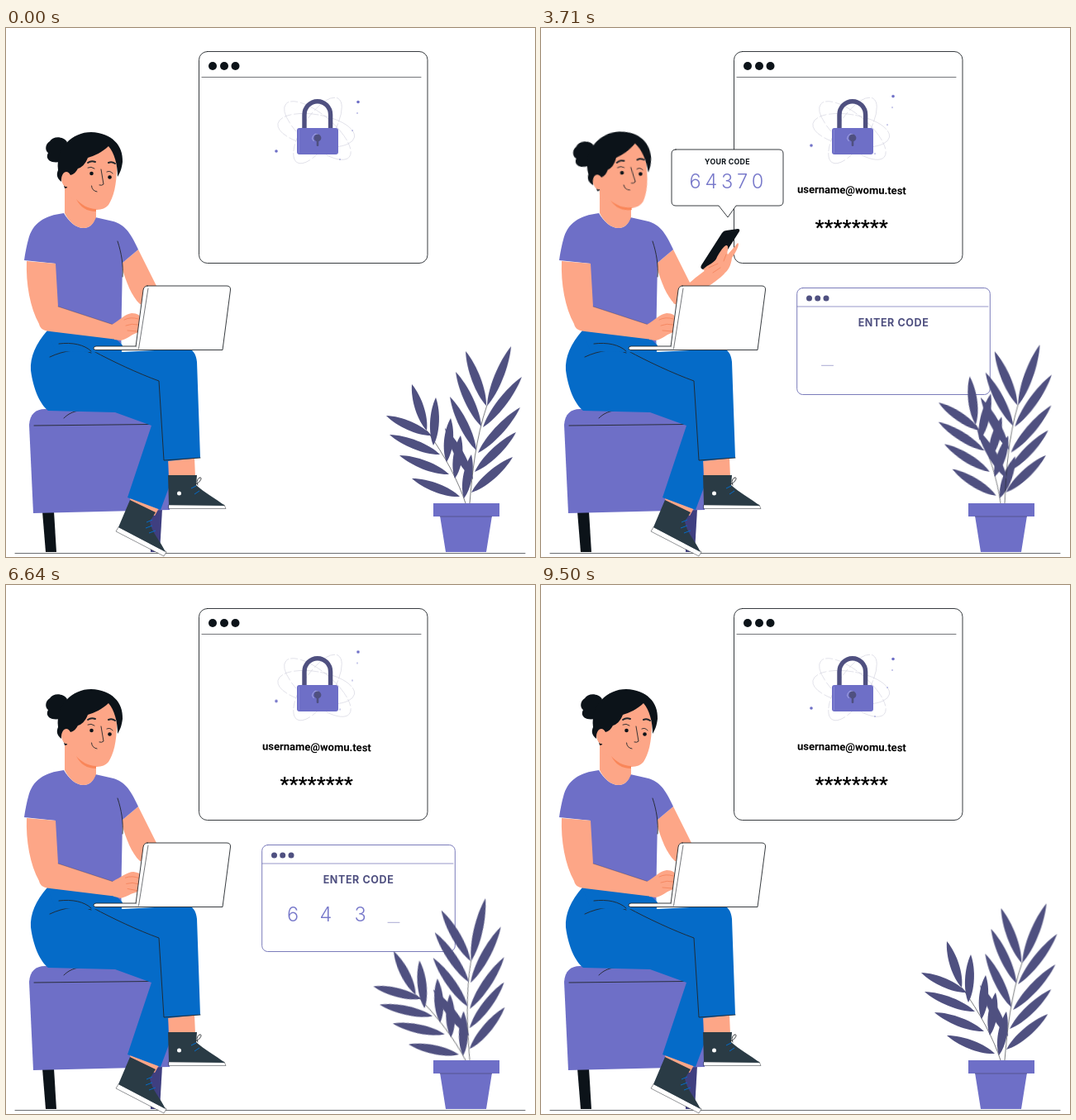
Recreate the animation shown at these times as an HTML page. Size 640x640 px, loop 9.57 s.

```html
<!DOCTYPE html>
<html lang="en">
<head>
<meta charset="utf-8">
<title>Two-step login</title>
<style>
html, body { margin: 0; width: 100%; height: 100%; overflow: hidden; background: #fff; }
svg { display: block; width: 100vw; height: 100vh; }
.skin { fill: #fda687; }
.blue { fill: #056bc8; }
.purple { fill: #6e6fc7; }
.plum { fill: #4f5080; }
.ink { fill: #0c1319; }
.shoe { fill: #2a3b45; }
.paper { fill: #fff; }
.line { fill: none; stroke: #22262b; stroke-width: .9; stroke-linecap: round; stroke-linejoin: round; }
.paper.line { fill: #fff; }
.brow { stroke-width: 2; }
.crease { fill: none; stroke: #f4865f; stroke-width: .9; stroke-linecap: round; }
.violet { stroke: #6d6eb4; }
.thin { stroke-width: .6; }
.orbit { fill: none; stroke: #c9c9d8; stroke-width: .5; stroke-dasharray: 30 2 9 3; }
.mail { font: 700 13px Roboto, sans-serif; }
.pass { font: 700 24.3px Roboto, sans-serif; }
.title { font: 700 12.5px Inter, sans-serif; letter-spacing: .6px; text-anchor: middle; }
.small { font-size: 8.8px; letter-spacing: .3px; }
.digits { font: 300 23.5px Inter, sans-serif; fill: #7778ca; }
.spaced { letter-spacing: 4.8px; }

#head, #arm, #code, #bubble, #shackle, #sparks, #stemL {
  animation: 9.57s cubic-bezier(.37, 0, .63, 1) infinite;
}
#head { transform-origin: 95px 215px; animation-name: look; }
#arm { transform-origin: 170px 322px; animation-name: lift; }
#code { transform-origin: 426.5px 379px; animation-name: window; }
#bubble { transform-origin: 226px 229px; animation-name: pop; }
#shackle { transform-origin: 361px 122px; animation-name: unlock; }
#sparks { animation-name: drift; }
#stemL { transform-origin: 556px 575px; animation-name: swayL; }
#stemR {
  transform-origin: 558px 575px;
  animation: swayR 2.3925s cubic-bezier(.37, 0, .63, 1) -.254s infinite alternate;
}
@keyframes look {
  0%, 30.3%, 55.4%, 100% { transform: rotate(0deg); }
  36.6%, 49.1% { transform: rotate(-8deg); }
}
@keyframes lift {
  0%, 26.12%, 58.52%, 100% { transform: rotate(90deg); visibility: hidden; }
  34.48%, 50.16% { transform: rotate(0deg); visibility: visible; }
}
@keyframes window {
  0%, 24.97%, 84.12%, 100% { transform: scale(0); }
  27.6%, 79.83% { transform: scale(1); }
  81.5% { transform: scale(1.1); }
}
@keyframes pop {
  0%, 33.96%, 58.73%, 100% { transform: scale(0); }
  36.57%, 56.22% { transform: scale(1); }
}
@keyframes unlock {
  0%, 77.3%, 96.66%, 100% { transform: rotate(0deg); }
  79.94%, 94.04% { transform: rotate(-21deg); }
}
@keyframes drift {
  0%, 98.2%, 100% { transform: translateY(0); }
  54.3%, 78.4% { transform: translateY(-8.5px); }
}
@keyframes swayL {
  0%, 100% { transform: rotate(0deg); }
  38.5% { transform: rotate(10.6deg); }
  62% { transform: rotate(-10deg); }
}
@keyframes swayR {
  from { transform: rotate(.3deg); }
  to { transform: rotate(-9.5deg); }
}
</style>
</head>
<body>
<svg viewBox="0 0 640 640">
  <path class="line" d="M11 635.5H628" stroke-opacity=".75"/>

  <!-- login window -->
  <rect class="paper line" x="233.5" y="28.5" width="276.5" height="256" rx="10"/>
  <path class="line" d="M237 59.5H502" stroke-opacity=".7"/>
  <g class="ink"><circle cx="250" cy="46" r="5"/><circle cx="264" cy="46" r="5"/><circle cx="277.5" cy="46" r="5"/></g>
  <g class="orbit">
    <ellipse cx="377" cy="124" rx="50" ry="19" transform="rotate(40 377 124)"/>
    <ellipse cx="377" cy="124" rx="47" ry="19" transform="rotate(10 377 114)"/>
    <ellipse cx="377" cy="124" rx="46" ry="18" transform="rotate(-57 377 124)"/>
  </g>
  <g id="sparks" class="purple">
    <circle cx="426" cy="89.5" r="1.8"/><circle cx="327" cy="149" r="1.8"/>
    <circle cx="425" cy="103" r=".7"/><circle cx="419" cy="124" r=".7"/><circle cx="404" cy="159" r=".7"/>
  </g>
  <path id="shackle" d="M361 123V105a15.8 16.3 0 0 1 31.6 0V123" fill="none" stroke="#4f5080" stroke-width="5.4"/>
  <rect class="purple" x="352" y="121" width="50" height="32" rx="3"/>
  <path d="M354.5 123V151" stroke="#8586d6"/>
  <path d="M372.5 137a5 5 0 0 1 5-8.5" fill="none" stroke="#a6a7e6"/>
  <circle class="plum" cx="377" cy="133" r="4.4"/>
  <rect class="plum" x="375.7" y="134" width="2.6" height="9" rx="1"/>
  <text id="mail" class="mail" x="310" y="199.5" transform="rotate(.8 310 199)"></text>
  <text id="pass" class="pass" x="331.5" y="248.5"></text>

  <!-- code window -->
  <g id="code">
    <rect class="paper line violet" x="309.7" y="314.5" width="233.6" height="129" rx="7"/>
    <path class="line violet" d="M310 337H541" stroke-opacity=".8"/>
    <g class="plum"><circle cx="324.5" cy="327" r="3.5"/><circle cx="334.7" cy="327" r="3.5"/><circle cx="345" cy="327" r="3.5"/></g>
    <text class="title plum" x="426.5" y="361">ENTER CODE</text>
    <g id="slots" class="digits" text-anchor="middle"></g>
    <path id="caret" class="line violet thin" d="M339.5 408.3h14"/>
  </g>

  <!-- stool -->
  <path class="ink" d="M44 585H58L61 634H48Z"/>
  <path d="M173 582H189L186 634H175Z" fill="#3f3f80"/>
  <path class="purple" d="M28 480C29 467 36 461 47 461L180 464L198 482V583L33 587Z"/>
  <path class="line" d="M34 481L175 479.5M70 472C75 467 81 464 88 463"/>

  <!-- far arm -->
  <path class="skin" d="M141 284L160 268L182 312C181 328 170 336 162 334C152 325 145 306 141 292Z"/>
  <g id="arm">
    <path class="skin" d="M160 333C167 319 178 308 203 290L222 297C211 309 190 319 168 336Z"/>
    <path class="ink" d="M194 287L219 248Q221 245 224 245L238 243Q241 243 240 246L212 290Q208 294 203 293L196 292Q192 291 194 287Z"/>
    <path class="skin" d="M196 292C202 286 211 284 213 277C217 270 222 262 225 263C228 265 224 272 226 274L238 260C241 261 236 271 231 278C230 287 226 297 216 300C207 301 201 297 196 292Z"/>
    <path class="crease" d="M203 290L214 285M208 296L217 290M224 274L221 282"/>
  </g>

  <!-- legs -->
  <path class="skin" d="M196 520H228L229 543H197ZM150 567L185 581L180 590L151 579Z"/>
  <path class="blue" d="M50 366C36 382 29 398 30 414C33 438 42 456 51 463L132 465L176 481L147 568L187 583L197 556L196 524L235 520L231 404C230 394 226 389 220 388L140 392L139 374Z"/>
  <path class="line" d="M106 391C128 403 160 418 185 427L191 523L235 520M53 398C70 390 90 387 103 393"/>
  <path class="paper line" stroke-opacity=".55" d="M197 577L264 577L266 581.5H197Z"/>
  <path class="shoe" d="M196 541H231L230 553C240 562 253 569 265 578L197 577Z"/>
  <circle class="paper" cx="209.5" cy="563" r="2.5"/>
  <path class="line" d="M229 552C234 551 239 543 234 544C231 546 230 550 232 553"/>
  <path class="paper line" stroke-opacity=".55" d="M136 604L133 609L191 639L194 634Z"/>
  <path class="shoe" d="M150 571L181 586L174 597C176 610 187 621 193 634L136 604Z"/>
  <path fill="none" stroke="#056bc8" d="M170 598L177 595M169 605L177 602M173 611L181 608M224 557L230 554M228 564L234 560"/>

  <!-- torso -->
  <path class="purple" d="M70 224C46 227 32 236 27 256C24 267 23 275 22 281L60 285L60 367L139 384L141 284L160 268C150 246 143 238 130 234L108 229C106 238 100 242 94 242C84 242 76 234 70 224Z"/>
  <path class="line" d="M135 258C140 273 142 287 141 301"/>
  <path class="blue" d="M50 366L133 376L141 384L139 393L60 391Z"/>
  <path class="line" d="M64 382C80 380 95 383 103 391"/>
  <path class="skin" d="M71 180V224C76 234 84 242 94 242C101 242 106 237 109 229V210Z"/>

  <!-- head -->
  <g id="head">
    <path class="ink" d="M74 138C70 131 57 130 53 137C47 141 47 148 51 151C47 158 53 164 65 162Z"/>
    <path class="ink" d="M68 183L71 194L75 193L78 176Z"/>
    <path class="skin" d="M76 173C70 171 66 177 67 183C68 189 71 193 74 192L73 203L86 209C98 222 117 223 124 214C130 205 134 190 134 168L130 142H92Z"/>
    <path d="M85 207C91 214 100 219 109 219V222C98 222 90 217 85 207Z" fill="#f98659"/>
    <path class="ink" d="M63 172C60 145 80 126 103 126C128 127 142 142 141 162C140 170 138 175 135 180C135 165 131 151 124 143C117 150 106 155 99 157C96 165 91 169 87 170C85 174 82 177 78 178C74 170 66 175 67 186C61 181 61 177 63 172Z"/>
    <circle class="ink" cx="103.5" cy="176" r="2.3"/><circle class="ink" cx="125.5" cy="180.5" r="2.3"/>
    <path class="line" d="M99 169Q103 167 107 170M122 174Q126 172 129 176M115 171L118 189Q116 191 113 190"/>
    <path class="line brow" d="M99 163Q103 160 108 162M124 163Q128 161 132 164"/>
    <path class="line" d="M103.5 191Q104 197 110 198"/>
  </g>

  <!-- near arm and laptop -->
  <path class="skin" d="M25 282L60 285L63 337L130 359L135 377L53 367C43 366 41 362 40 358C29 338 24 310 25 282Z"/>
  <path class="line" stroke-opacity=".3" d="M63 337L130 359"/>
  <g id="hand">
    <path class="skin" d="M128 359C138 353 144 346 152 345C159 345 164 348 161 352L161 368C152 370 146 377 139 378L131 377Z"/>
    <path class="crease" d="M143 353Q151 349 160 352M145 360Q152 357 160 359M147 366L159 367"/>
  </g>
  <path class="paper line" d="M171 312H267Q272 312 271.5 317L262 389.5H156.500L166 317Q167 312 171 312Z"/>
  <path class="line" d="M172 315L160.5 388" stroke-opacity=".7"/>
  <path class="paper line" d="M157 385H109Q106 385 106 387.5Q106 389.5 109 389.5H160"/>

  <!-- message -->
  <g id="bubble">
    <path class="paper line" d="M163 147H288Q293 147 293 152V210Q293 215 288 215H236L226 229L215 215H163Q158 215 158 210V152Q158 147 163 147Z"/>
    <text class="title small ink" x="225.5" y="165">YOUR CODE</text>
    <text class="digits spaced" x="179.5" y="194">64370</text>
  </g>

  <!-- plant -->
  <g id="stemL" class="plum"><path class="line thin" d="M556 575C548 550 531 517 509 487"/></g>
  <g id="stemR" class="plum"><path class="line thin" d="M561 575C564 540 568 497 582 456"/></g>
  <path class="purple" d="M525 590H588L581 634H532ZM517 575H597V591H517Z"/>
  <path d="M525 591H588" stroke="#4f5080" stroke-width=".8"/>
</svg>
<script>
const LOOP = 9570, NS = 'http://www.w3.org/2000/svg';
const $ = id => document.getElementById(id);
const add = (parent, tag, attrs, text = '') => {
  const el = document.createElementNS(NS, tag);
  for (const k in attrs) el.setAttribute(k, attrs[k]);
  el.textContent = text;
  return parent.appendChild(el);
};

// Each leaf runs from its tip to the point where it joins the stem.
function leaf(stem, [tx, ty, bx, by]) {
  const dx = bx - tx, dy = by - ty, len = Math.hypot(dx, dy);
  const nx = -dy / len * 7.2, ny = dx / len * 7.2;
  const side = s => [.3, .75].map(p => `${tx + dx * p + nx * s} ${ty + dy * p + ny * s}`);
  const [a, b] = side(1), [c, d] = side(-1);
  add(stem, 'path', { d: `M${tx} ${ty}C${a} ${b} ${bx} ${by}C${d} ${c} ${tx} ${ty}Z`.replace(/C(\S+ \S+ \S+ \S+) /g, 'C$1 ') });
}
[[491, 431, 509, 487], [460, 469, 515, 493], [464, 492, 525, 516], [476, 517, 536, 540], [491, 545, 549, 567],
 [520, 447, 517, 505], [538, 472, 533, 525], [550, 493, 543, 545], [563, 516, 554, 569]].forEach(l => leaf($('stemL'), l));
[[611, 385, 582, 457], [624, 422, 577, 483], [622, 459, 571, 514], [617, 489, 567, 537], [613, 519, 563, 562],
 [556, 391, 581, 457], [544, 416, 575, 482], [537, 446, 569, 511], [531, 484, 565, 546]].forEach(l => leaf($('stemR'), l));

const split = (id, text) => [...text].map(ch => add($(id), 'tspan', {}, ch));
const mail = split('mail', 'username@womu.test');
const pass = split('pass', '********');
const slotX = [347, 387, 428.5, 469.5, 508.5];
const slots = [...'64370'].map((n, i) => add($('slots'), 'text', { x: slotX[i], y: 407 }, n));

const type = (chars, t, start, step) => chars.forEach((el, i) =>
  el.setAttribute('fill-opacity', Math.min(1, Math.max(0, (t - start) / step - i))));

function tapping(t) {
  for (const [from, taps] of [[660, 3], [5430, 3]]) {
    const p = (t - from) / 540;
    if (p > 0 && p < taps) return 6 * (1 - Math.cos(p * 2 * Math.PI));
  }
  return 0;
}

function draw() {
  const t = performance.now() % LOOP;
  type(mail, t, 805, 50);
  type(pass, t, 1760, 70);
  const typed = Math.min(5, Math.max(0, Math.floor((t - 5300) / 450) + 1));
  slots.forEach((el, i) => el.setAttribute('opacity', i < typed ? 1 : 0));
  $('caret').setAttribute('opacity', typed < 5 ? 1 : 0);
  $('caret').setAttribute('transform', `translate(${slotX[Math.min(typed, 4)] - 347})`);
  $('hand').setAttribute('transform', `rotate(${tapping(t)} 132 368)`);
  requestAnimationFrame(draw);
}
draw();
</script>
</body>
</html>
```
